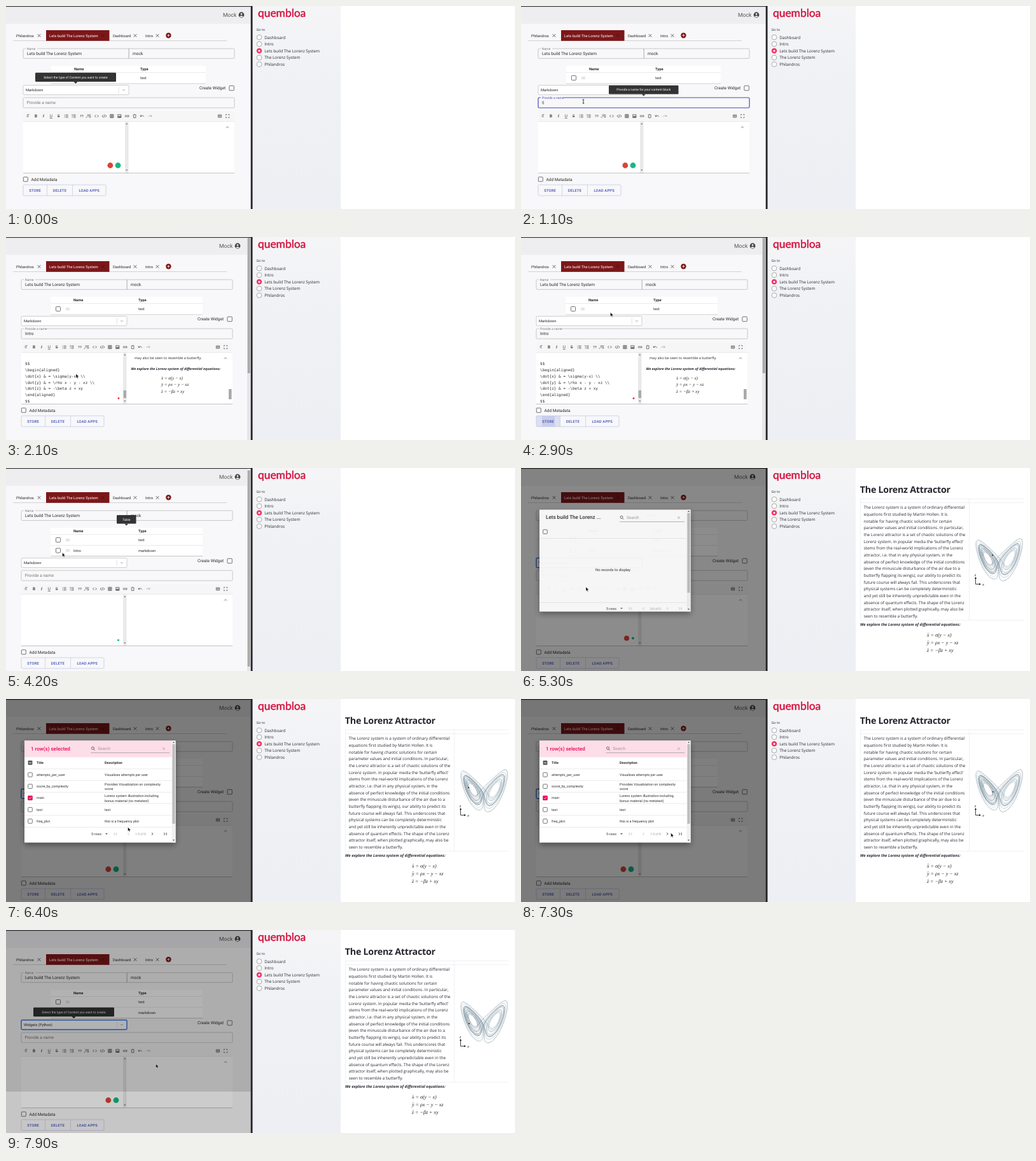
An HTML page that plays this animation: 800 by 319 pixels, repeating every 8000 ms.

```html
<!DOCTYPE html>
<html lang="en">
<head>
<meta charset="utf-8">
<title>Content editor</title>
<style>
  html, body { margin: 0; width: 100%; height: 100%; overflow: hidden; background: #fff; }
  svg { display: block; font-family: Roboto, sans-serif; text-rendering: geometricPrecision; }
  text { white-space: pre; }
  .side, .page { font-family: "Open Sans", sans-serif; fill: #262730; }
  .mono { font-family: "DejaVu Sans Mono", monospace; }
  .math { font-family: "Liberation Serif", serif; font-style: italic; fill: #222; }
  .line { fill: none; stroke: #555; stroke-width: .8; }
  .b { font-weight: 700; }
  .m { font-weight: 500; }
  .i { font-style: italic; }
</style>
</head>
<body>
<svg id="stage" width="800" height="319" viewBox="0 0 800 319"></svg>
<script>
const LOOP = 8000;
const INK = '#2b2b2b', GREY = '#777', BLUE = '#3f51b5', PINK = '#f50057', BG = '#f8f7f9';

// Drawing helpers
const text = (x, y, size, str, attrs = '') =>
  `<text x="${x}" y="${y}" font-size="${size}" ${attrs}>${str}</text>`;
const rect = (x, y, w, h, fill, attrs = '') =>
  `<rect x="${x}" y="${y}" width="${w}" height="${h}" fill="${fill}" ${attrs}/>`;
const dot = (x, y, r, fill, attrs = '') => `<circle cx="${x}" cy="${y}" r="${r}" fill="${fill}" ${attrs}/>`;
const path = (d, attrs = '') => `<path class="line" d="${d}" ${attrs}/>`;
const on = (from, to, content) => `<g data-on="${from},${to}">${content}</g>`;
const cross = (x, y, color, r = 2.4) =>
  path(`M${x - r} ${y - r}l${2 * r} ${2 * r}m0 ${-2 * r}l${-2 * r} ${2 * r}`, `style="stroke:${color}"`);
const box = (x, y, s = 7) =>
  rect(x - s / 2, y - s / 2, s, s, 'none', 'rx=".8" stroke="#666" stroke-width=".9"');
const hline = (x, y, w, color = '#ddd') => rect(x, y, w, .6, color);
const center = 'text-anchor="middle"';

function field(x, y, w, h, label, notch, color, stroke) {
  return rect(x, y, w, h, 'none', `rx="1.5" stroke="${color}" stroke-width="${stroke}"`) +
    rect(x + 4, y - 1, notch, 2, BG) + text(x + 6, y + 1.5, 5, label, `fill="${color === BLUE ? BLUE : GREY}"`);
}

function tooltip(x, y, w, h, label) {
  const cx = x + w / 2;
  return rect(x, y, w, h, '#333', 'rx="1.2"') +
    `<path d="M${cx - 3} ${y + h}h6l-3 3z" fill="#333"/>` +
    text(cx, y + h / 2 + 1.8, 5.05, label, `fill="#fff" ${center}`);
}

function tabs() {
  const names = [[16, 'Philandros', 52], [168, 'Dashboard', 203], [219, 'Intro', 238]];
  return hline(11, 54.2, 336, '#bbb') + rect(63, 38, 99.5, 16.8, '#7c1719') +
    names.map(([x, s, cx]) => text(x, 48.6, 5.88, s, `fill="${INK}"`) + cross(cx, 46.5, '#444')).join('') +
    text(68, 48.6, 5.88, 'Lets build The Lorenz System', 'fill="#fff"') + cross(152, 46.5, '#4a0c0e') +
    dot(255.4, 46.2, 4.2, '#7c1719') + path('M253.2 46.2h4.4m-2.2-2.2v4.4', 'style="stroke:#fff"');
}

function table(inset, rows) {
  const x = 71 + inset, w = 243 - 2 * inset;
  const row = ([name, type], i) => {
    const y = 113 + 16.6 * i;
    return hline(x, y - 8.6, w) + box(83 + inset, y) +
      path(`M${95 + inset} ${y - 1}h6m0 2.2h-6`, 'style="stroke:#aaa;stroke-width:.6"') +
      text(107 + inset, y + 2, 5.8, name) + text(211, y + 2, 5.8, type);
  };
  return rect(x, 94, w, 27.3 + 16.6 * (rows.length - 1), '#fff', 'filter="url(#soft)"') +
    text(107 + inset, 101, 5.8, 'Name', 'class="b"') + text(211, 101, 5.8, 'Type', 'class="b"') +
    rows.map(row).join('');
}

function toolbar() {
  const letters = [['T', ''], ['B', 'class="b"'], ['I', 'class="b i"'],
    ['U', 'text-decoration="underline"'], ['S', 'text-decoration="line-through"']];
  const shapes = [
    'M-1-2h4m-4 2h4m-4 2h4M-3-2h1m-1 2h1m-1 2h1', 'M-1-2h4m-4 2h4m-4 2h4M-2.5-3v2m-.5 1h1m-1 2h1',
    'M-2-1.5h1.5v1.5l-1 1.5M1-1.5h1.5v1.5l-1 1.5', 'M-3-2h6M-3 0h5q1.2 1 0 2h-2m-3 0h-2',
    'M-1-2l-2 2 2 2M1-2l2 2-2 2', 'M-1.5-2l-2 2 2 2M1.5-2l2 2-2 2M.6-2.5l-1.2 5',
    'M-2.6-2.6h5.2v5.2h-5.2zM-2.6-.8h5.2m-5.2 1.7h5.2M0-2.6v5.2',
    'M-2.6-2.4h5.2v4.8h-5.2zM-2 1.6l1.4-2 1 1 1-1.2 1 2.2zM-2 1h4',
    'M-.6-1.2h-1.2a1.2 1.2 0 0 0 0 2.4h1.2M.6-1.2h1.2a1.2 1.2 0 0 1 0 2.4h-1.2M-1.2 0h2.4',
    'M-1.8-1.4v4h3.6v-4M-2.5-2h5M-.7-2.7h1.4', 'M-2.8-1.6v2.2h2.2M-2.8.4q3-3.4 5.6.8',
    'M2.8-1.6v2.2h-2.2M2.8.4q-3-3.4-5.6.8'];
  const at = i => 35 + 11.94 * i;
  return letters.map(([s, a], i) => text(at(i), 175.3, 6.4, s, `fill="#444" ${center} ${a}`)).join('') +
    text(31.8, 175.3, 4.4, 'T', 'fill="#444"') +
    shapes.map((d, i) => path(d, `transform="translate(${at(i + 5)} 173)" opacity="${i < 11 ? 1 : .45}"`)).join('') +
    path('M333.4 171h5.2v4h-5.2zM334.4 172.5h3.4M334.6 174h2.8') +
    path('M345.6 172v-1.6h1.6m2 0h1.6v1.6m0 2v1.6h-1.6m-2 0h-1.6v-1.6');
}

function formulas(x, y, size, gap) {
  const lines = [['x', 'σ(y − x)'], ['y', 'ρx − y − xz'], ['z', '−βz + xy']];
  return `<g class="math">` + lines.map(([v, rhs], i) =>
    text(x, y + i * gap, size, `${v} = ${rhs}`) +
    dot(x + size * .24, y + i * gap - size * .62, size * .065, '#222')).join('') + '</g>';
}

function editor() {
  const code = ['$$', '\\begin{aligned}', '\\dot{x} &amp; = \\sigma(y-x) \\\\', '\\dot{y} &amp; = \\rho x - y - xz \\\\',
    '\\dot{z} &amp; = -\\beta z + xy', '\\end{aligned}', '$$'];
  const written =
    code.map((s, i) => text(33, 201 + 9.85 * i, 6.05, s, 'class="mono"')).join('') +
    rect(187.6, 241, 4.4, 12, '#aaa') + rect(353, 239, 4.6, 16, '#aaa') +
    '<g class="page">' + text(205, 192, 5.5, 'may also be seen to resemble a butterfly.') +
    text(199.5, 208.7, 5.4, 'We explore the Lorenz system of differential equations:', 'class="b i"') + '</g>' +
    formulas(247, 224, 7, 10.3) + dot(180, 253.5, 1.5, '#e03a3a');
  const marks = dot(163.8, 250.5, 4.4, '#dd4433') + dot(176, 250.5, 4.4, '#15b886');
  return rect(27, 166, 332, 96, '#fff', 'filter="url(#soft)"') + rect(27, 166, 332, 15, '#f6f6f7') +
    hline(27, 181, 332) + rect(187, 181.5, 5.5, 80.5, '#e9e9ea') +
    '<path d="M188.2 186l1.6-2 1.6 2zM188.2 257l1.6 2 1.6-2z" fill="#777"/>' +
    toolbar() + path('M346 191.5l2-2 2 2') +
    on(0, 1900, marks) + on(2100, 3700, written) + on(3700, 5200, dot(179.5, 253.5, 1.6, '#15b886')) +
    on(5200, 5400, dot(169, 250.5, 4, '#dd4433') + dot(179, 250.5, 2, '#15b886')) + on(5400, LOOP, marks);
}

function lowerForm() {
  const idle = rect(27, 144, 332, 16, 'none', 'rx="1.5" stroke="#bbb" stroke-width=".8"') +
    text(32.5, 154.4, 6.6, 'Provide a name', `fill="${GREY}"`);
  const pick = 'Select the type of Content you want to create';
  const buttons = [[45.6, 'STORE'], [84.5, 'DELETE'], [130.7, 'LOAD APPS']];
  return rect(27, 124.5, 166, 15, '#fff', 'rx="1.5" stroke="#c4c4c4" stroke-width=".8"') +
    on(4600, LOOP, rect(27, 124.5, 166, 15, 'none', 'rx="1.5" stroke="#2f6fe4" stroke-width="1.3"')) +
    on(0, 4900, text(31, 134.4, 5.85, 'Markdown')) + on(4900, LOOP, text(31, 134.4, 5.85, 'Widgets (Python)')) +
    rect(176.8, 127.5, .6, 9, '#ccc') + path('M183 131l2 2 2-2', 'style="stroke:#999"') +
    text(304, 131.3, 6.55, 'Create Widget') + box(354.6, 129, 7.4) +
    on(0, 700, idle) +
    on(700, 2100, field(27, 144, 332, 16, 'Provide a name', 36, BLUE, 1.2) + text(33, 154.4, 6.6, '', 'id="typed"')) +
    on(2100, 3700, field(27, 144, 332, 16, 'Provide a name', 36, '#bbb', .8) + text(33, 154.4, 6.6, 'Intro')) +
    on(3700, LOOP, idle) + editor() +
    box(30.8, 272.3, 7) + text(39.5, 274.7, 6.55, 'Add Metadata') +
    on(2600, 3300, rect(27, 281, 37.5, 17, '#dcdff1') + rect(36, 281, 20, 17, '#c9cdea')) +
    rect(27, 281, 130, 17, 'none', 'rx="1.7" stroke="#c3c8e6" stroke-width=".8"') +
    rect(64.3, 281, .7, 17, '#c3c8e6') + rect(104, 281, .7, 17, '#c3c8e6') +
    buttons.map(([x, s]) => text(x, 291.6, 5.85, s, `class="m" letter-spacing=".16" fill="${BLUE}" ${center}`)).join('') +
    on(0, 300, tooltip(46, 104.8, 127, 14.2, pick)) + on(7700, LOOP, tooltip(46, 104.8, 127, 14.2, pick)) +
    on(800, 1900, tooltip(138, 124.8, 109.5, 13.6, 'Provide a name for your content block'));
}

function form() {
  const first = ['', 'text'];
  return field(27, 67, 332, 15.4, 'Name', 18, '#bbb', .8) + rect(192.7, 67, .8, 15.4, '#999') +
    text(33, 77, 6.6, 'Lets build The Lorenz System') + text(199, 77, 6.6, 'mock') +
    on(0, 2100, table(0, [first])) + on(2100, 3700, table(2, [first])) +
    on(3700, LOOP, table(2, [first, ['Intro', 'markdown']])) +
    `<g id="lower">${lowerForm()}</g>` +
    on(3900, 4400, tooltip(177, 74, 30.5, 13.5, 'Table'));
}

function search(x) {
  return dot(x + 3, 77.3, 2, 'none', 'stroke="#555" stroke-width=".9"') + path(`M${x + 4.4} 78.8l2 2`) +
    text(x + 11, 80.3, 6.4, 'Search', 'fill="#999"') + hline(x, 84.4, 257 - x, '#888') + cross(248, 78, '#aaa', 1.9);
}

function pager(y, range, live) {
  const nav = (d, x, lit) => path(d, `transform="translate(${x} ${y})" style="stroke:${lit ? '#333' : '#bbb'}"`);
  return text(134, y + 2, 5.4, '5 rows') + `<path d="M156 ${y - 1}h4l-2 2z" fill="#555"/>` +
    nav('M-2.2-2.2v4.4M2-2l-2 2 2 2', 172.5) + nav('M1-2l-2 2 2 2', 192.5) +
    text(211.5, y + 2, 5, range, `fill="#999" ${center}`) +
    nav('M-1-2l2 2-2 2', 230, live) + nav('M-2-2l2 2-2 2M2.2-2.2v4.4', 250, live);
}

function modal() {
  const rows = [['attempts_per_user', 'Visualizes attempts per user'],
    ['score_by_complexity', 'Provides Visualization on complexity', 'score'],
    ['main', 'Lorenz system illustration including', 'bonus material (no metatext)'],
    ['test', 'test'], ['freq_plot', 'this is a frequency plot']];
  const row = ([name, a, b], i) => {
    const y = 119 + 18.25 * i;
    return hline(29, y - 9.4, 231) + box(38, y, 6.6) + text(48, y + 1.9, 5.4, name) +
      (b ? text(155, y - 1.6, 5.4, a) + text(155, y + 6, 5.4, b) : text(155, y + 1.9, 5.4, a));
  };
  const title = text(39, 80.4, 8.1, 'Lets build The Lorenz ...', 'class="m"') + search(155);
  return rect(29, 65.5, 237.5, 160, '#fff', 'filter="url(#deep)"') +
    on(0, 5500, title + box(38, 100.2, 6.6) + hline(29, 110, 231) +
      text(144.5, 161.6, 5.85, 'No records to display', center) + hline(29, 211, 231) + pager(220.8, '0-0 of 0', false)) +
    on(5500, 6100, title + box(38, 100.2, 6.6)) +
    on(6100, LOOP, rect(29, 65.5, 231.5, 26, '#fddde8') +
      text(39, 80.6, 8, '1 row(s) selected', `class="m" fill="${PINK}"`) + search(133.5) +
      rect(34.6, 96.8, 6.8, 6.8, '#555', 'rx=".8"') + rect(36, 99.8, 4, .9, '#fff')) +
    on(5500, LOOP, text(48, 102.2, 5.4, 'Title', 'class="b"') + text(155, 102.2, 5.4, 'Description', 'class="b"') +
      rows.map(row).join('') + hline(29, 201, 231) + pager(212, '1-5 of 8', true)) +
    on(6100, LOOP, rect(34.5, 152, 7, 7, PINK, 'rx=".8"') + path('M36 155.6l1.4 1.4 2.6-3', 'style="stroke:#fff"')) +
    rect(260.5, 65.5, 6, 160, '#f1f1f1') + rect(261.4, 71, 4.2, 125, '#bdbdbd') +
    '<path d="M262 69l1.5-2 1.5 2zM262 221l1.5 2 1.5-2z" fill="#555"/>';
}

function sidebar() {
  const items = ['Dashboard', 'Intro', 'Lets build The Lorenz System', 'The Lorenz System', 'Philandros'];
  return rect(387, 0, 139, 319, 'url(#side)') +
    text(396, 17.2, 17.4, 'quembloa', 'font-family="Lato, sans-serif" style="fill:#d4143f;stroke:#d4143f;stroke-width:.5;stroke-linejoin:round"') +
    '<g class="side">' + text(393.5, 39, 5.3, 'Go to') + items.map((s, i) => {
      const y = 49.2 + 10.6 * i;
      const mark = i === 2 ? dot(398, y, 4.2, '#f63366') + dot(398, y, 1.5, '#fff')
        : dot(398, y, 3.9, '#fafafb', 'stroke="#999" stroke-width=".8"');
      return mark + text(406.3, y + 2.3, 6.4, s);
    }).join('') + '</g>';
}

function butterfly() {
  const tones = ['#3f5868', '#7690a0', '#a3b4be'];
  let x = -12, y = -15, z = 29, out = '';
  for (const tone of tones) {
    let d = '';
    for (let i = 0; i < 3600; i++) {
      const h = .002, dx = 10 * (y - x), dy = x * (28 - z) - y, dz = x * y - 8 / 3 * z;
      x += h * dx; y += h * dy; z += h * dz;
      if (i % 4 === 0) d += `${d ? 'L' : 'M'}${(751 + 2.08 * x).toFixed(1)} ${(189 - 1.74 * z).toFixed(1)}`;
    }
    out += path(d, `style="stroke:${tone};stroke-width:.5" stroke-dasharray="2.4 .5"`);
  }
  return out + path('M714.5 173v9.5h6.5', 'style="stroke:#111"') +
    '<path d="M713 174l1.5-3 1.5 3zM720 181l3 1.5-3 1.5z" fill="#111"/>' +
    '<g class="math">' + text(712.8, 169.8, 6.5, 'z') + text(725, 184.6, 6.5, 'x') + '</g>' +
    '<circle id="point" r=".95" fill="#111"/>';
}

function page() {
  const lines = `The Lorenz system is a system of ordinary differential
equations first studied by Martin Hollen. It is
notable for having chaotic solutions for certain
parameter values and initial conditions. In particular,
the Lorenz attractor is a set of chaotic solutions of the
Lorenz system. In popular media the ‘butterfly effect’
stems from the real-world implications of the Lorenz
attractor, i.e. that in any physical system, in the
absence of perfect knowledge of the initial conditions
(even the minuscule disturbance of the air due to a
butterfly flapping its wings), our ability to predict its
future course will always fail. This underscores that
physical systems can be completely deterministic
and yet still be inherently unpredictable even in the
absence of quantum effects. The shape of the Lorenz
attractor itself, when plotted graphically, may also be
seen to resemble a butterfly.`.split('\n');
  const rule = '#e4e6ec';
  return '<g class="page">' +
    text(532.8, 39.4, 14.3, 'The Lorenz Attractor', 'class="b" letter-spacing="-.28"') +
    [48.3, 54.3, 238.8].map(y => hline(533, y, 257, rule)).join('') +
    [533, 704.3].map(x => rect(x, 48.3, .6, 190.5, rule)).join('') +
    lines.map((s, i) => text(538.7, 64.4 + 10.65 * i, 6.4, s)).join('') +
    text(533, 248.2, 6.05, 'We explore the Lorenz system of differential equations:', 'class="b i"') + '</g>' +
    formulas(638, 264.5, 8, 12) + butterfly();
}

const arrow = '<path d="M0 0v6.4l1.5-1.4 1 2.2 1.1-.5-1-2.1h2.1z" fill="#111" stroke="#fff" stroke-width=".4"/>';
const stage = document.getElementById('stage');
stage.innerHTML = `
  <defs>
    <linearGradient id="side" x2="0" y2="1"><stop stop-color="#f5f5f7"/><stop offset=".4" stop-color="#eff1f4"/><stop offset="1" stop-color="#edeff4"/></linearGradient>
    <filter id="soft" x="-5%" y="-10%" width="110%" height="125%"><feDropShadow dx="0" dy=".7" stdDeviation=".7" flood-opacity=".3"/></filter>
    <filter id="deep" x="-10%" y="-10%" width="120%" height="125%"><feDropShadow dx="0" dy="4" stdDeviation="5" flood-opacity=".4"/></filter>
  </defs>
  ${rect(0, 0, 800, 319, '#fff')}${rect(0, 0, 386, 319, BG)}${rect(0, 0, 386, 28, '#eeeef0')}${rect(0, 0, 386, 1.2, '#3a3a3c')}
  <g fill="${INK}">
    <g id="account">${text(341, 17.3, 8.6, 'Mock', 'fill="#555"')}${dot(370, 14, 4.4, '#444')}${dot(370, 12.7, 1.4, '#eee')}<path d="M367.2 16.4q2.8-2.4 5.6 0q-2.8 2.6-5.6 0z" fill="#eee"/></g>
    ${tabs()}
    <g id="form">${form()}</g>
    ${on(2100, 5100, rect(379, 1, 5.5, 318, '#e6e6e8'))}
    ${on(2100, 3700, rect(379.7, 1, 4, 213, '#aaa'))}${on(3700, 5100, rect(379.7, 4, 4, 308, '#aaa'))}
    ${rect(0, 0, 385, 254, '#000', 'id="shadeTop"')}${rect(0, 254, 385, 65, '#000', 'id="shadeLow"')}
    <g id="modal">${modal()}</g>
  </g>
  ${sidebar()}${rect(384.7, 0, 2.8, 319, '#232326')}
  ${on(4400, LOOP, page())}
  <g id="cursor">
    ${on(100, 700, arrow)}${on(1900, LOOP, arrow)}
    ${on(700, 1900, path('M-1.3-3h2.6M0-3v6m-1.3 0h2.6', 'style="stroke:#111"'))}
  </g>`;

// Piecewise linear value at time t; each key is [time, ...values]
function ramp(keys, t) {
  const n = keys.findIndex(k => k[0] > t);
  if (n <= 0) return keys[n < 0 ? keys.length - 1 : 0].slice(1);
  const a = keys[n - 1], b = keys[n], p = (t - a[0]) / (b[0] - a[0]);
  return a.slice(1).map((v, i) => v + (b[i + 1] - v) * p);
}

const el = id => document.getElementById(id);
const parts = [...stage.querySelectorAll('[data-on]')].map(g => [g, ...g.dataset.on.split(',').map(Number)]);
const shadeKeys = end => [[5000, 0], [5300, .45], [5400, .5], [7600, .5], [7900, end]];
const modalKeys = [[5000, 0], [5300, .93], [5400, 1], [7500, 1], [7800, 0]];
const mouseKeys = [[100, 120, 128], [700, 98, 150], [1900, 98, 150], [2100, 110, 215], [2300, 110, 215],
  [2600, 45, 289], [2700, 45, 289], [2900, 140.5, 118.5], [3300, 150, 50], [3700, 120, 110], [4200, 88.5, 133],
  [4600, 108, 149], [4900, 102, 187], [5400, 102, 187], [5900, 38, 154], [6100, 38, 154], [6400, 191.5, 201.5],
  [7200, 235.5, 210.5]];
const keyTimes = [1000, 1200, 1300, 1500, 1600];

function draw(t) {
  for (const [g, from, to] of parts) g.style.display = t >= from && t < to ? '' : 'none';
  const scrolled = t >= 2100;
  el('form').setAttribute('transform', `translate(${scrolled ? -3 : 0} 0)`);
  el('account').setAttribute('transform', `translate(${scrolled ? -6 : 0} 0)`);
  el('lower').setAttribute('transform', `translate(0 ${t >= 3700 ? 17 : 0})`);
  el('typed').textContent = 'Intro'.slice(0, keyTimes.filter(k => k <= t).length) + (t < 1800 ? '|' : '');
  el('shadeTop').style.opacity = ramp(shadeKeys(.3), t)[0];
  el('shadeLow').style.opacity = ramp(shadeKeys(.2), t)[0];
  const fade = ramp(modalKeys, t)[0];
  el('modal').style.opacity = fade;
  el('modal').style.display = fade ? '' : 'none';
  el('cursor').setAttribute('transform', `translate(${ramp(mouseKeys, t)})`);
  const turn = -.55 + (t - 5300) / 2600 * 3 * Math.PI;
  el('point').setAttribute('cx', 734.5 + 7.8 * Math.cos(turn));
  el('point').setAttribute('cy', 142 + 9.5 * Math.sin(turn));
}

const start = performance.now();
function tick() {
  draw(Math.floor((performance.now() - start) % LOOP / 100) * 100);
  requestAnimationFrame(tick);
}
tick();
</script>
</body>
</html>
```
